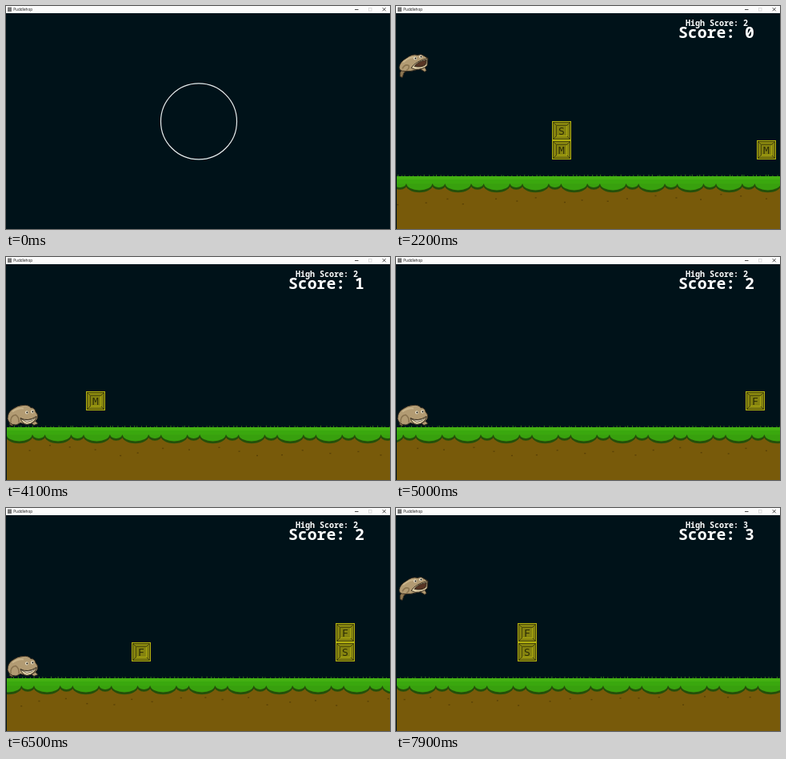
Animation, 480 px wide and 279 px high, one loop 8 s. Source, as an HTML page with a canvas:

```html
<!DOCTYPE html>
<html lang="en">
<head>
<meta charset="utf-8">
<title>Puddlehop</title>
<style>
  html, body { margin: 0; width: 100%; height: 100%; overflow: hidden; background: #001219; }
  #stage { position: relative; width: 480px; height: 279px; overflow: hidden; background: #001219; }
  #game, canvas, #ring, #bar, #bar svg { position: absolute; left: 0; top: 0; }
  #game { width: 480px; height: 279px; }
  #bar { width: 480px; height: 9px; background: #fbfbfb; }
  #bar span { position: absolute; left: 9.3px; top: 0; font: 4.7px/8.4px "Open Sans", sans-serif; color: #111; }
  .score { position: absolute; white-space: pre; color: #fff; font-family: "Noto Sans Mono", "DejaVu Sans Mono", monospace; font-weight: bold; }
  #high { left: 362px; top: 14.6px; font-size: 10px; line-height: 12px; }
  #now { left: 353px; top: 21.2px; font-size: 19.8px; line-height: 24px; }
</style>
</head>
<body>
<div id="stage">
  <div id="game">
    <canvas id="view" width="480" height="279"></canvas>
    <div id="high" class="score"></div>
    <div id="now" class="score"></div>
  </div>
  <svg id="ring" width="480" height="279"><circle cx="241" cy="144.4" r="47.5" fill="none" stroke="#e8eced" stroke-width="1.2"/></svg>
  <div id="bar">
    <span>Puddlehop</span>
    <svg width="480" height="9" fill="none" stroke="#222" stroke-width=".8">
      <rect x="2" y="1.5" width="5" height="5.5" fill="#777" stroke="none"/>
      <path d="M436 4.5h4.5M470.7 2.2l4 4m0-4l-4 4"/>
      <rect x="453.4" y="2.4" width="3.6" height="3.6" stroke="#d5d5d5"/>
    </svg>
  </div>
</div>
<script>
const $ = id => document.getElementById(id);
const ctx = $("view").getContext("2d");
const STEP = 100, LOOP = 8000, TILE = 48.4, BLOCK = 24;
const SKY = "#001219";

// Scrolled distance at a few moments; linear in between.
const track = [[0, -241], [1300, 0], [3000, 310], [4100, 515.5], [5800, 834.8], [7200, 1094.8], [8000, 1243.4]];
const stacks = [[359, "MS"], [615, "M"], [1121.8, "F"], [1376.8, "SF"]];
const jumps = [[2000, 680, 150], [6629, 700, 165], [7772, 700, 165]]; // start, length, height
const ducks = [[2780, 3400], [4300, 4850]];
const PASS_X = 26;

function scrollAt(t) {
  const i = Math.max(1, track.findIndex(p => p[0] >= t));
  const [t0, x0] = track[i - 1], [t1, x1] = track[i];
  return x0 + (x1 - x0) * (t - t0) / (t1 - t0);
}

function liftAt(t) {
  for (const [start, length, height] of jumps) {
    const p = (t - start) / length;
    if (p > 0 && p < 1) return 4 * height * p * (1 - p);
  }
  return 0;
}

const mod = (a, n) => ((a % n) + n) % n;
const noise = i => mod(Math.sin(i * 12.9898) * 43758.5453, 1);

function rect(x, y, w, h, color) {
  ctx.fillStyle = color;
  ctx.fillRect(x, y, w, h);
}

function disc(x, y, r, color) {
  ctx.fillStyle = color;
  ctx.beginPath();
  ctx.arc(x, y, r, 0, 7);
  ctx.fill();
}

// Lower half of an ellipse, hanging from y.
function lobe(x, y, rx, ry, color) {
  ctx.fillStyle = color;
  ctx.beginPath();
  ctx.ellipse(x, y, rx, ry, 0, 0, Math.PI);
  ctx.fill();
}

function shape(d, fill, line = "#30261a", width = .9) {
  const p = new Path2D(d);
  if (fill) { ctx.fillStyle = fill; ctx.fill(p); }
  if (line) { ctx.strokeStyle = line; ctx.lineWidth = width; ctx.stroke(p); }
}

function drawGround(shift) {
  rect(0, 222, 480, 57, "#785a0a");
  const first = mod(-shift, TILE) - TILE;
  const lobes = (grow, color) => {
    for (let x = first; x < 490; x += TILE) {
      lobe(x + 16.5, 222, 16 + grow, 8.5 + grow * 1.5, color);
      lobe(x + 40.8, 222, 7.5 + grow, 5 + grow * 1.5, color);
    }
  };
  rect(0, 220, 480, 4.5, "#24500a");
  lobes(1.8, "#24500a");
  lobes(0, "#38a00e");
  rect(0, 213, 480, 9.5, "#3aa80e");
  rect(0, 213, 480, 4, "#44b012");

  // Grass blades and pebbles follow the scroll.
  for (let i = Math.floor(shift / 5); i * 5 < shift + 485; i++) {
    const x = i * 5 - shift + noise(i) * 3, h = 1 + noise(i + 9) * 1.2;
    rect(x, 213 - h, 1, h, "#2f7d18");
  }
  for (let i = Math.floor(shift / 29); i * 29 < shift + 500; i++) {
    const x = i * 29 - shift + noise(i + 3) * 15, y = 235 + noise(i + 7) * 13;
    rect(x, y, 2, 1.4, "#5a4207");
  }
  rect(0, 200, 1, 79, SKY);
}

function drawBlock(x, y, letter) {
  rect(x, y, BLOCK, BLOCK, "#b5b30f");
  rect(x + 1, y + 1, 22, 22, "#4a490a");
  rect(x + 2, y + 2, 20, 20, "#85830f");
  ctx.strokeStyle = "#4a490a";
  ctx.lineWidth = 1;
  ctx.beginPath();
  for (const [cx, cy, dx, dy] of [[2, 2, 1, 1], [22, 2, -1, 1], [2, 22, 1, -1], [22, 22, -1, -1]]) {
    ctx.moveTo(x + cx, y + cy);
    ctx.lineTo(x + cx + dx * 4, y + cy + dy * 4);
  }
  ctx.stroke();
  rect(x + 5, y + 5, 14, 14, "#4a490a");
  rect(x + 6, y + 6, 13, 13, "#a9a70f");
  rect(x + 6, y + 6, 12, 12, "#85830f");
  ctx.fillStyle = "#2c2c06";
  ctx.font = "13px 'DejaVu Sans Mono', monospace";
  ctx.textAlign = "center";
  ctx.fillText(letter, x + 12, y + 16.8);
}

const SKIN = "#b29b73", SHADE = "#8b7551", PALE = "#dccba3";

function eye(x, y) {
  disc(x, y, 1.9, "#f0e8d0");
  disc(x + .4, y, 1, "#15110c");
}

function drawWalker(alt) {
  ctx.save();
  if (alt) ctx.translate(-1, -.5);
  shape(alt ? "M7 203L5 210L9 212L13 206Z" : "M12 206L14 213L17 217L24 214L19 207Z", SHADE);
  shape(alt ? "M29 206L36 211L41 209L36 204Z" : "M32 203L38 208L42 206L45 207L43 202L38 200Z", SKIN);
  shape("M3 203Q3 195 9 191Q16 186 22 186Q29 185 32 189Q37 189 38 194Q42 198 40 203Q36 209 26 210L19 208Q14 212 9 210Q4 208 3 203Z", SKIN);
  shape("M7 208Q6 199 13 198Q18 201 17 208", null, SHADE, 1.6);
  shape("M9 194Q16 189 23 190", null, "#c9b48b", 2);
  shape("M19 202Q28 207 39 200Q37 209 27 210Q21 209 19 202Z", PALE);
  shape("M20 203Q28 207 37 202L34 205L27 207Z", "#fff6df", "#30261a", .6);
  eye(27, 195);
  eye(34, 194);
  ctx.restore();
}

function drawDucker() {
  shape("M37 206L42 204L43 201L46 203L44 206L40 209Z", SKIN);
  shape("M6 208Q5 200 13 198Q20 197 25 200Q34 196 39 200Q43 204 41 210Q37 215 28 214L10 215Q6 213 6 208Z", SKIN);
  shape("M9 212Q11 202 18 205Q23 210 18 213", null, SHADE, 1.8);
  shape("M17 199Q21 202 22 208", null);
  shape("M22 209Q31 210 41 206Q39 214 29 214Q23 213 22 209Z", PALE);
  shape("M23 209Q31 212 40 208L34 212L27 212Z", "#fff6df", "#30261a", .6);
  eye(30, 203);
  eye(37, 203);
}

function drawJumper() {
  shape("M8 203L5 208L5 213L8 214L10 208L16 204Z", SHADE);
  shape("M27 202L33 205L36 207L38 205L36 201L31 199Z", SKIN);
  shape("M4 201Q5 194 13 190Q20 184 27 186Q32 184 35 187L40 190L39 199Q34 203 27 204Q18 207 10 206Q4 206 4 201Z", SKIN);
  shape("M8 203Q11 197 16 199Q17 203 13 205", null, SHADE, 1.6);
  shape("M9 195Q16 188 24 189", null, "#c9b48b", 2);
  shape("M19 202Q24 194 39 190L39 199Q34 204 24 204Z", PALE);
  shape("M23 200Q27 194 38 192L37 198Q32 202 23 200Z", "#573524");
  eye(24, 190);
  eye(31, 188);
}

function drawFrog(t) {
  const lift = liftAt(t);
  ctx.save();
  ctx.translate(0, -lift);
  ctx.lineJoin = "round";
  if (lift) drawJumper();
  else if (ducks.some(([a, b]) => t >= a && t < b)) drawDucker();
  else drawWalker(t / STEP % 3 === 2);
  ctx.restore();
}

function drawIris(t) {
  const r = 47.5 + t * .35, open = r > 285;
  $("game").style.clipPath = open ? "none" : `circle(${r}px at 241px 144.4px)`;
  $("ring").style.display = open ? "none" : "";
  $("ring").firstElementChild.setAttribute("r", r);
}

function frame(now) {
  const t = Math.floor(now % LOOP / STEP) * STEP;
  const shift = scrollAt(t);
  rect(0, 0, 480, 279, SKY);
  drawGround(shift + 16.8);
  let score = 0;
  for (const [start, letters] of stacks) {
    const x = start - shift;
    if (x < PASS_X) score++;
    [...letters].forEach((c, i) => drawBlock(Math.round(x), 168 - i * BLOCK, c));
  }
  drawFrog(t);
  drawIris(t);
  $("high").textContent = "High Score: " + Math.max(2, score);
  $("now").textContent = "Score: " + score;
  requestAnimationFrame(frame);
}
requestAnimationFrame(frame);
</script>
</body>
</html>
```
